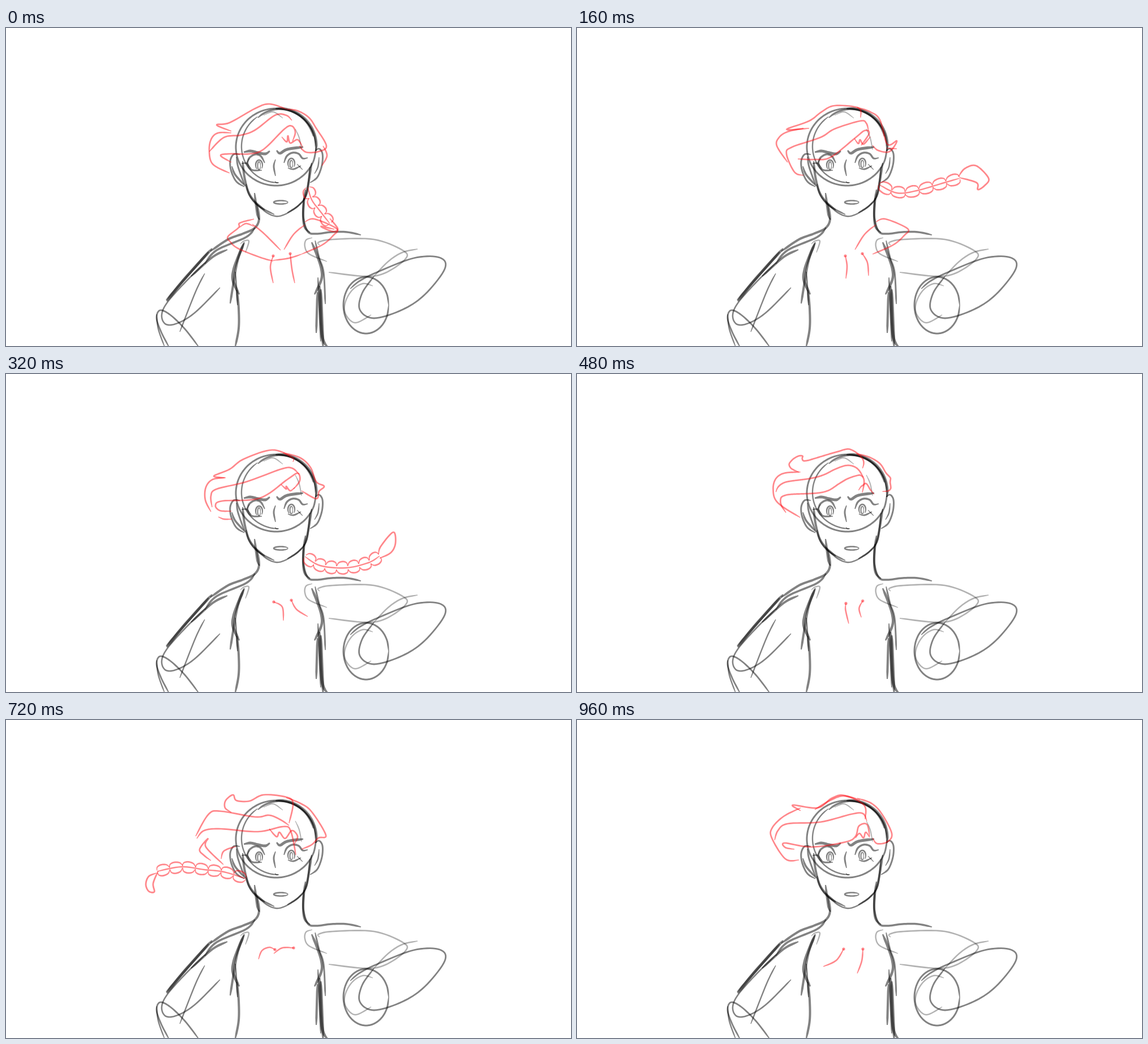
Write an HTML page with a canvas that moves like this. It is 998 by 561 pixels and loops after 1.04 s.

```html
<!DOCTYPE html>
<html lang="en">
<head>
<meta charset="utf-8">
<title>Hair in the wind</title>
<style>
html, body { margin: 0; width: 100%; height: 100%; overflow: hidden; background: #fff; }
canvas { display: block; width: 998px; height: 561px; }
</style>
</head>
<body>
<canvas id="stage" width="998" height="561"></canvas>
<script>
const ctx = document.getElementById('stage').getContext('2d');
const STEP = 80, COUNT = 13;

const points = text => text.split(',').map(p => p.trim().split(' ').map(Number));
const mix = (a, b, t) => a + (b - a) * t;
const gap = (p, q) => Math.hypot(q[0] - p[0], q[1] - p[1]);

// Catmull-Rom curve through the points
function curve(p, sub = 9) {
  const out = [];
  for (let i = 0; i < p.length - 1; i++) {
    const a = p[i - 1] || p[i], b = p[i], c = p[i + 1], d = p[i + 2] || c;
    for (let k = 0; k < sub; k++) {
      const t = k / sub;
      out.push([0, 1].map(j => b[j] + t / 2 * (c[j] - a[j] +
        t * (2 * a[j] - 5 * b[j] + 4 * c[j] - d[j] + t * (3 * (b[j] - c[j]) + d[j] - a[j])))));
    }
  }
  out.push(p[p.length - 1]);
  return out;
}

function lengths(line) {
  const at = [0];
  for (let i = 1; i < line.length; i++) at.push(at[i - 1] + gap(line[i - 1], line[i]));
  return at;
}

function resample(pts, n) {
  const line = curve(pts), at = lengths(line), total = at[at.length - 1];
  let i = 1;
  return Array.from({ length: n }, (_, k) => {
    const s = total * k / (n - 1);
    while (i < line.length - 1 && at[i] < s) i++;
    const t = (s - at[i - 1]) / (at[i] - at[i - 1] || 1);
    return [0, 1].map(j => mix(line[i - 1][j], line[i][j], t));
  });
}

function blend(a, b, t, n = 26) {
  const p = resample(a, n), q = resample(b, n);
  return p.map((v, k) => [mix(v[0], q[k][0], t), mix(v[1], q[k][1], t)]);
}

const normal = (a, b) => {
  const d = gap(a, b) || 1;
  return [(b[1] - a[1]) / d, (a[0] - b[0]) / d];
};

// Line shifted sideways
const offset = (line, r) => line.map((p, i) => {
  const n = normal(line[Math.max(0, i - 1)], line[Math.min(line.length - 1, i + 1)]);
  const d = typeof r === 'function' ? r(i) : r;
  return [p[0] + n[0] * d, p[1] + n[1] * d];
});

// Brush line with thin ends
function brush(w, pts) {
  const line = curve(pts), at = lengths(line), total = at[at.length - 1];
  const half = i => w / 2 * (.5 + .5 * Math.min(1, Math.min(at[i], total - at[i]) / 10));
  ctx.beginPath();
  offset(line, half).concat(offset(line, i => -half(i)).reverse())
    .forEach(p => ctx.lineTo(p[0], p[1]));
  ctx.fill();
}
const ink = (w, text) => brush(w, points(text));

// Part of an ellipse, angles in degrees
function oval(w, x, y, rx, ry, from = 0, to = 360) {
  brush(w, Array.from({ length: 17 }, (_, k) => {
    const a = mix(from, to, k / 16) * Math.PI / 180;
    return [x + rx * Math.cos(a), y + ry * Math.sin(a)];
  }));
}

function drawHead() {
  oval(3, 477, 210, 71, 68);
  oval(2.4, 482, 209, 66, 64, 90, 235);
  oval(5, 482, 208, 66, 66, -95, 8);
  oval(3.5, 484, 208, 61, 65, -130, -15);
  ink(3, '413 223,402 223,396 235,398 253,407 271,421 280');
  ink(3.5, '399 244,405 259,423 279');
  ink(3, '407 227,410 245,421 276');
  ink(3, '546 217,553 213,559 222,558 242,550 263,537 273');
  ink(2.4, '553 228,551 245,545 257');
  ink(4, '418 235,421 262,428 289,440 307,457 321');
  ink(3, '424 275,430 295,446 314,474 329');
  ink(2.4, '438 305,458 324,476 332,492 329,512 317,527 303');
  ink(4, '540 238,532 286,526 304');
  ink(3, '537 245,531 292,518 312,497 326');
}

function drawFace() {
  ink(5, '420 219,432 217,445 220,458 222,466 217');
  ink(5, '478 216,484 221,497 214,525 210');
  ink(3.4, '425 239,430 229,440 223,450 226,457 238');
  ink(3, '416 239,425 239,430 247,437 251,452 251');
  ink(2.4, '430 230,427 239,433 248');
  oval(2.6, 447, 242, 6, 9, 130, 400);
  oval(2, 447, 243, 2.5, 7);
  ink(3.4, '491 238,496 226,506 220,517 222,524 230,533 229');
  oval(2.6, 504, 239, 6, 9, 130, 400);
  oval(2, 504, 240, 2.5, 6.5);
  ink(3, '498 247,508 249,521 243');
  ink(2, '514 240,524 250');
  ink(3, '476 232,473 244,476 261');
  ink(3, '475 271,478 273,481 273');
  oval(2.6, 485.5, 307.5, 12.5, 3);
}

function drawLeft() {
  ink(4, '439 291,444 329,448 338');
  ink(4, '443 310,447 337,439 353,418 363,392 373,361 394');
  ink(5, '364 389,340 415,309 450,284 482');
  ink(4, '358 395,335 421,283 480');
  ink(3.6, '440 352,424 369,372 392,351 416');
  ink(4, '391 391,365 404,327 438');
  ink(2.6, '352 414,318 447,285 484,275 507,283 523,305 520,335 501,378 458');
  ink(2.4, '351 433,335 465,307 536');
  ink(2.8, '288 563,274 536,266 512,272 498,290 506,316 531,340 562');
  ink(2.4, '266 505,269 531,280 562');
  ink(5, '421 378,410 404,402 427,401 446,412 470');
  ink(4, '420 380,408 415,396 486');
  ink(4, '408 462,411 495,411 530,405 562');
  ink(3, '405 430,409 489');
}

function drawRight() {
  ink(4, '529 285,526 309,525 335,528 352,537 361');
  ink(3.5, '526 300,525 333,533 359,548 363,575 360,602 360,627 365');
  ink(4.5, '540 378,549 400,557 425,557 444,545 470');
  ink(3, '546 375,553 405,561 431,564 487');
  ink(4, '550 466,548 538');
  ink(5, '554 455,558 540,568 563');
  ink(5, '556 461,560 562');
  ink(3, '551 440,556 553');
  ink(2.8, '608 460,625 446,655 431,720 406,766 405,775 425,740 470,700 497,650 512,625 497,629 468,650 438');
  oval(3, 636, 489, 40, 50);
}

function drawFaint() {
  ink(2.6, '554 383,552 378,577 373,650 373,702 393,705 408,670 432,635 438,570 431');
  ink(2.6, '650 438,675 412,700 396,727 390');
  ink(2.4, '648 455,630 451,611 463,599 485,600 505,617 520,645 506');
  ink(2.4, '541 370,530 374,528 386,536 399,567 412');
  ink(2.4, '414 381,420 376,429 376,423 396');
  ink(2, '455 154,472 148,489 159');
  ink(2, '511 178,518 194,522 215');
}

// Each hair pose names its locks, so that neighbours can be blended.
const locks = ['crown', 'side', 'lock', 'under', 'fringe', 'back'];
const settled = {
  crown: '398 182,372 171,395 167,440 142,465 134,495 143',
  side: '495 143,515 146,535 158,548 177,566 208,552 218,530 219,518 208',
  lock: '505 163,495 154,475 154,440 180,415 189,385 193,359 218',
  under: '398 237,379 225,395 222,430 222,455 214,492 178,505 173,511 184,506 200',
  fringe: '487 192,496 201,498 190,502 203,515 197,524 210',
  back: '398 185,375 185,363 195,359 215,365 240,395 256',
  extra: '560 208,567 225,558 243'
};
const swept = {
  crown: '410 177,370 179,410 164,432 148,455 137,497 141,501 158',
  side: '495 140,518 148,535 162,548 205,565 199,552 218,532 216,522 207',
  lock: '515 182,511 168,500 164,455 178,430 193,380 210,370 222,384 254,400 260',
  under: '390 231,420 232,448 228,490 195,508 181,516 186,502 207',
  fringe: '490 195,497 204,500 197,506 205,518 192',
  back: '400 177,372 183,357 193,353 208,372 237',
  extra: '547 212,565 213'
};
const smooth = {
  crown: '386 183,367 180,395 168,420 150,470 134,505 147,507 155',
  side: '490 139,520 148,538 165,548 190,562 198,553 207,548 220,522 206',
  lock: '518 177,505 166,485 168,425 190,372 203,362 215,364 235',
  under: '398 242,378 241,370 232,382 224,448 219,497 186,515 175,519 188,508 203',
  fringe: '486 195,495 203,495 198,502 206,510 200',
  back: '388 183,365 186,353 200,352 222,362 243',
  extra: '375 252,385 256,399 256'
};
const tossed = {
  crown: '395 168,382 160,378 147,388 134,401 131,396 142,403 152,460 138,485 132,507 152,503 172',
  side: '495 141,520 148,540 160,558 197,548 208',
  lock: '500 185,490 165,475 157,455 163,435 174,410 180,358 185,345 195',
  under: '355 246,353 222,365 208,430 203,455 190,475 181,498 182,502 212',
  fringe: '503 210,508 195,520 192,532 218',
  back: '398 168,365 170,347 182,343 205,355 232,410 258',
  extra: '510 208,512 231,520 241,518 213'
};
const lifted = {
  crown: '398 163,387 155,388 142,401 132,407 142,430 143,455 132,495 136,507 147,500 182',
  side: '495 137,520 147,540 162,565 203,552 208,540 220,522 228',
  lock: '500 186,485 176,465 168,440 171,380 161,358 166,335 205',
  under: '337 209,350 195,380 192,445 197,490 188,503 196,512 238',
  fringe: '465 192,478 206,483 198,493 209,505 195,515 205,510 218',
  back: '362 248,350 239,342 228,357 209,353 224,384 255',
  extra: '380 245,385 231,406 223'
};
const flicked = {
  crown: '396 160,386 148,390 131,400 143,430 149,480 134,500 140,511 170,503 185',
  side: '495 138,525 148,545 165,555 190,567 204,547 214',
  lock: '505 188,490 175,435 175,405 170,375 170,342 200',
  under: '345 217,352 207,375 202,410 207,465 190,490 184,507 210',
  fringe: '503 210,508 198,520 207,531 226,511 213',
  back: '395 160,372 160,360 172,340 192,332 215,363 248',
  extra: '362 230,368 248,383 260'
};
const sinking = {
  crown: '395 160,381 150,425 155,450 138,472 133,507 150,509 175',
  side: '495 138,520 147,538 165,556 200,548 215,530 218,522 208',
  lock: '512 178,505 165,485 166,430 180,372 183,355 195,349 212',
  under: '384 228,368 225,367 217,415 224,475 215,492 205,498 187,512 184,517 205',
  fringe: '492 208,499 200,506 208,510 198,517 207',
  back: '395 155,365 170,345 190,344 208,368 245,392 247',
  extra: '420 158,445 143,470 134,500 141'
};

// A plait has a core line, a half width, a number of bumps and a tip.
const plait = (core, r, n, tip) => ({ core: points(core), r, n, tip: points(tip) });
const between = (a, b) => ({
  core: blend(a.core, b.core, .5), tip: blend(a.tip, b.tip, .5),
  r: (a.r + b.r) / 2, n: Math.round((a.n + b.n) / 2)
});
const hang = plait('533 281,540 303,554 322,572 345', 10, 4,
  '572 336,586 354,577 359,556 350,580 355');
const right = plait('533 276,565 291,600 287,645 274,676 265', 8, 6,
  '674 262,685 248,705 243,727 265,720 278,708 285,706 273,676 264');
const whip = plait('530 294,575 313,640 314,770 294', 9, 8,
  '768 288,800 276,838 278,867 290,838 293,805 304,768 300');
const dip = plait('528 322,555 338,600 342,640 333,660 321', 10, 7,
  '658 318,662 304,684 279,688 298,680 315,660 325');
const fall = plait('533 290,545 325,558 370', 11, 4,
  '547 370,558 388,576 398,570 372');
const left = plait('424 277,390 276,350 277,318 288,298 319', 7, 7,
  '296 318,291 334,300 341,313 341,303 318,293 320');
const high = plait('424 280,385 268,350 264,310 259,267 267', 8, 7,
  '266 270,252 276,247 290,252 302,262 303,260 288,269 266');
const low = plait('424 284,390 303,345 314,300 306,270 298', 9, 7,
  '270 297,258 288,245 272,238 283,243 297,272 300');
const drop = plait('422 286,390 320,344 351', 9, 6,
  '346 345,313 332,308 344,318 359,346 360');

function drawPlait({ core, r, n, tip }) {
  brush(2.4, core);
  brush(2.8, tip);
  const row = resample(core, n + 1);
  for (const side of [-1, 1]) {
    const edge = offset(row, side * r * .6);
    for (let i = 0; i < n; i++) {
      const p = edge[i], q = edge[i + 1], v = normal(p, q);
      const on = (t, h) => [0, 1].map(j => mix(p[j], q[j], t) + v[j] * side * h);
      brush(2.7, [on(0, -3), on(.2, 3), on(.6, 5), on(.92, 2.5), on(1, -3)]);
    }
  }
}

function drawHood(whole) {
  ink(2.6, '528 342,545 337,584 354,578 366,558 383,522 399');
  ink(2.6, '528 347,508 364,491 391');
  if (!whole) return;
  ink(2.6, '522 399,500 406,472 410');
  ink(2.6, '438 337,413 344,411 352,392 368,396 377,410 389,450 405,472 411');
  ink(2.6, '438 350,424 345,412 352');
  ink(2.6, '435 346,455 362,485 392');
}

const key = (hair, cordA, cordB) => ({
  hair: locks.map(k => points(hair[k])), extra: points(hair.extra),
  cords: [points(cordA), points(cordB)]
});
const keys = [
  key(settled, '472 402,467 422,472 450', '502 398,505 425,510 450'),
  key(swept, '474 402,477 420,475 442', '504 398,513 414,515 437'),
  key(smooth, '473 402,488 411,490 435', '504 399,513 415,533 428'),
  key(tossed, '476 406,468 420,475 443', '505 401,490 412,487 430'),
  key(lifted, '475 405,465 401,452 407,446 422', '508 402,488 402,473 412'),
  key(flicked, '475 405,467 401,454 406,444 420', '508 401,487 413,468 415'),
  key(sinking, '471 404,458 424,435 435', '505 404,503 425,495 447')
];
const stops = [0, .5, 1, 1.5, 2, 2.33, 2.67, 3, 3.5, 4, 5, 5.5, 6];
const plaits = [hang, between(hang, right), right, whip, dip, fall, null,
  left, between(left, high), high, low, drop, null];

function draw(n) {
  ctx.fillStyle = '#fff';
  ctx.fillRect(0, 0, 998, 561);
  ctx.fillStyle = 'rgba(0,0,0,.3)';
  drawFaint();
  ctx.fillStyle = 'rgba(0,0,0,.49)';
  drawHead();
  drawFace();
  drawLeft();
  drawRight();

  ctx.fillStyle = 'rgba(255,0,10,.47)';
  const i = Math.floor(stops[n]), t = stops[n] - i, a = keys[i], b = keys[i + 1];
  const pose = part => t ? a[part].map((s, k) => blend(s, b[part][k], t)) : a[part];
  pose('hair').forEach(s => brush(2.7, s));
  if (!t) brush(2.7, a.extra);
  pose('cords').forEach(s => {
    brush(2.6, s);
    ctx.beginPath();
    ctx.arc(s[0][0], s[0][1], 2.6, 0, 7);
    ctx.fill();
  });
  if (n < 3) drawHood(n < 2);
  if (plaits[n]) drawPlait(plaits[n]);
}

let shown = -1;
const start = performance.now();
function tick() {
  const n = Math.floor((performance.now() - start) / STEP) % COUNT;
  if (n !== shown) draw(shown = n);
  requestAnimationFrame(tick);
}
tick();
</script>
</body>
</html>
```
